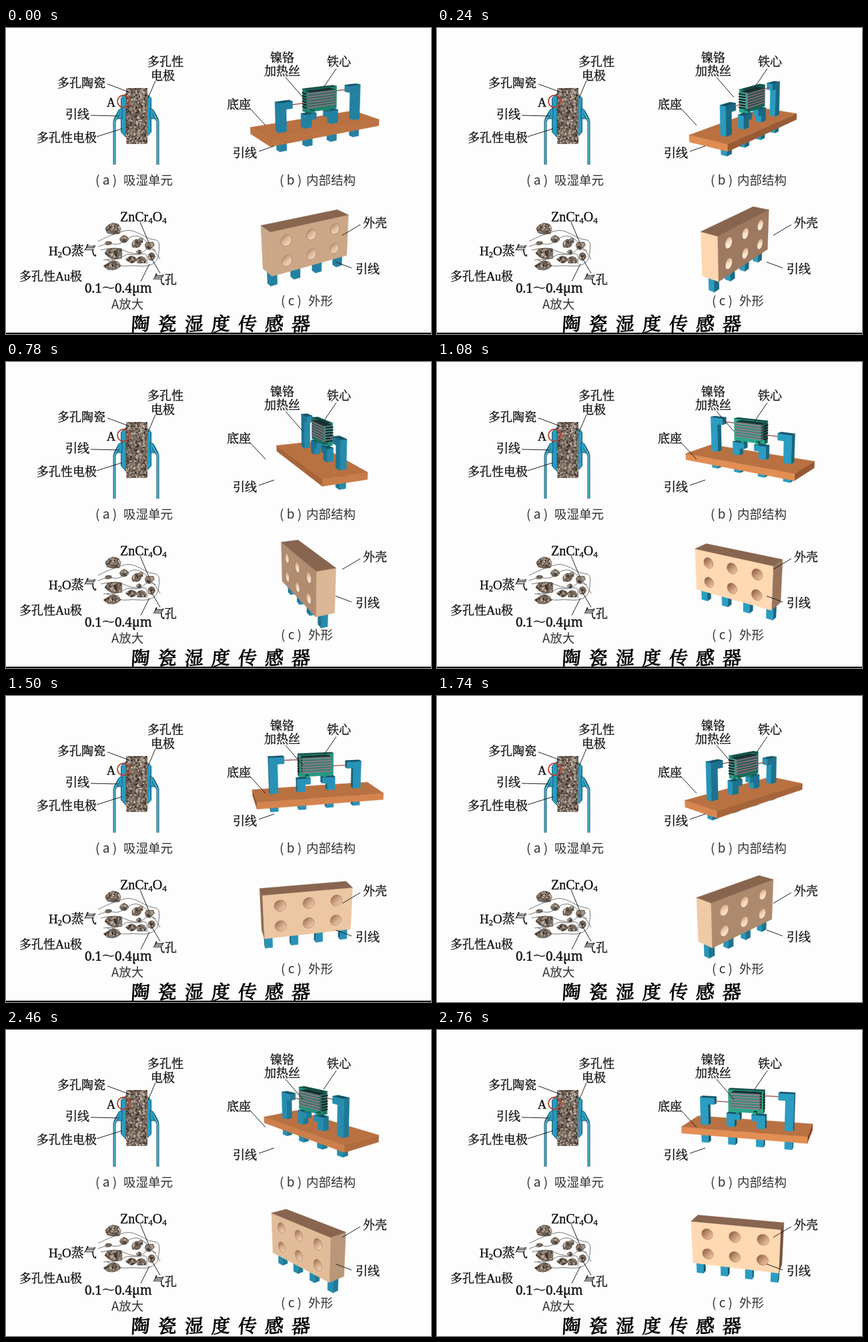
An HTML page with a canvas for the animation above (2820 ms loop, 637 px wide and 459 px high).

```html
<!DOCTYPE html>
<html lang="zh">
<head>
<meta charset="utf-8">
<title>陶瓷湿度传感器</title>
<style>
html, body { margin: 0; width: 100%; height: 100%; overflow: hidden; background: #fdfdfd; }
canvas { display: block; }
</style>
</head>
<body>
<canvas id="stage" width="637" height="459"></canvas>
<script>
const W = 637, H = 459, STEP = 60, STEPS = 47, RULE_END = 1680;
const SERIF = '"Liberation Serif", "Noto Serif CJK SC", "Noto Sans CJK SC", serif';
const SANS = '"Noto Sans CJK SC", "Noto Sans CJK", sans-serif';
const WIDE = '"Noto Serif", "Noto Serif CJK SC", "Noto Sans CJK SC", serif';
const stage = document.getElementById('stage').getContext('2d');
const backdrop = document.createElement('canvas');
backdrop.width = W;
backdrop.height = H;
let g = backdrop.getContext('2d');

let seed = 7;
const rnd = () => (seed = (seed * 16807) % 2147483647) / 2147483647;
const clamp = x => Math.max(0, Math.min(1, x));
const mix = (a, b, t) => `rgb(${a.map((v, i) => Math.round(v + (b[i] - v) * t))})`;

function trace(pts, closed = true) {
  g.beginPath();
  pts.forEach(([x, y], i) => i ? g.lineTo(x, y) : g.moveTo(x, y));
  if (closed) g.closePath();
}
function fill(pts, color, edge = color, width = 0.5) {
  trace(pts);
  g.fillStyle = color;
  g.fill();
  g.strokeStyle = edge;
  g.lineWidth = width;
  g.stroke();
}
function line(pts, color = '#222', width = 1) {
  trace(pts, false);
  g.strokeStyle = color;
  g.lineWidth = width;
  g.stroke();
}

// ---------- fixed drawing ----------

function mottle(pts) {
  const xs = pts.map(p => p[0]), ys = pts.map(p => p[1]);
  const x0 = Math.min(...xs), y0 = Math.min(...ys);
  const w = Math.max(...xs) - x0, h = Math.max(...ys) - y0;
  const tones = ['#3c322c', '#50443b', '#6c5c50', '#a79788', '#c6b9ab', '#85766a'];
  g.save();
  trace(pts);
  g.clip();
  g.fillStyle = '#796a5e';
  g.fillRect(x0, y0, w, h);
  for (let i = 0; i < w * h / 5; i++) {
    g.fillStyle = tones[Math.floor(rnd() * tones.length)];
    g.beginPath();
    g.ellipse(x0 + rnd() * w, y0 + rnd() * h, 0.8 + rnd() * 1.7, 0.7 + rnd(), rnd() * 3, 0, 7);
    g.fill();
  }
  g.restore();
}

function rock(x, y, rx, ry) {
  const pts = [];
  for (let i = 0; i < 8; i++) {
    const a = i * Math.PI / 4, r = 0.75 + rnd() * 0.4;
    pts.push([x + Math.cos(a) * rx * r, y + Math.sin(a) * ry * r]);
  }
  mottle(pts);
  trace(pts);
  g.strokeStyle = '#4a4038';
  g.lineWidth = 0.6;
  g.stroke();
}

function wave(pts) {
  g.beginPath();
  g.moveTo(...pts[0]);
  for (let i = 1; i < pts.length - 1; i++) {
    const [x, y] = pts[i], [nx, ny] = pts[i + 1];
    g.quadraticCurveTo(x, y, (x + nx) / 2, (y + ny) / 2);
  }
  g.lineTo(...pts[pts.length - 1]);
  g.strokeStyle = '#555';
  g.lineWidth = 0.8;
  g.stroke();
}

function ink(text, x, y, weight) {
  g.fillText(text, x, y);
  g.lineWidth = weight;
  g.strokeText(text, x, y);
}

// Parts after "_" are one subscript character.
function label(text, x, y, size = 18, family = SERIF) {
  const weight = family === SANS ? 0.01 : 0.35;
  g.fillStyle = g.strokeStyle = family === SANS ? '#333' : '#111';
  text.split('_').forEach((part, i) => {
    if (i) {
      g.font = `${size * 0.66}px ${family}`;
      ink(part[0], x, y + size * 0.36 + 3, weight);
      x += g.measureText(part[0]).width;
      part = part.slice(1);
    }
    g.font = `${size}px ${family}`;
    ink(part, x, y + size * 0.36, weight);
    x += g.measureText(part).width;
  });
}

function drawUnit() {
  const teal = '#2a9cc0', edge = '#155a70';
  for (const side of [-1, 1]) {
    const at = (dx, y) => [195 + side * dx, y];
    fill([at(15, 98), at(22.5, 105), at(22.5, 156), at(15, 164)], teal, edge, 1);
    fill([at(21, 120), at(26, 123), at(33, 136), at(33, 141), at(28, 136), at(21, 136)], teal, edge, 1);
    line([at(26, 128), at(32.5, 140), at(32.5, 205)], edge, 4);
    line([at(26, 128), at(32.5, 140), at(32.5, 205)], '#5cc0d8', 1.8);
  }
  mottle([[180, 90], [212, 90], [212, 174], [180, 174]]);
  g.beginPath();
  g.arc(176, 110, 9, 0, 7);
  g.strokeStyle = '#b5402c';
  g.lineWidth = 1.8;
  g.stroke();
  line([[224, 79], [213, 105]]);
  line([[152, 84], [187, 97]]);
  line([[127, 131], [168, 132]]);
  line([[136, 163], [174, 151]]);
}

function drawPores() {
  const rocks = [
    [160, 301, 13, 10], [177, 317, 7, 6], [154, 323, 5, 3], [162, 338, 14, 9], [160, 357, 12, 8],
    [195, 324, 8, 7], [202, 319, 4, 4], [215, 326, 7, 6], [188, 347, 8, 6],
    [203, 348, 8, 6], [218, 343, 6, 6], [199, 336, 4, 3]
  ];
  rocks.forEach(r => rock(...r));
  wave([[138, 320], [152, 313], [166, 308], [184, 302], [202, 309], [215, 317], [229, 318], [230, 331], [227, 350], [212, 358], [190, 356], [172, 358], [150, 347]]);
  wave([[138, 328], [152, 322], [170, 326], [188, 311], [204, 313], [223, 334], [231, 347]]);
  wave([[142, 333], [165, 328], [183, 337], [202, 340], [211, 330], [225, 334]]);
  wave([[146, 348], [171, 347], [181, 338], [195, 341], [212, 337], [211, 354]]);
  line([[201, 291], [214, 322]]);
  line([[202, 380], [215, 354]]);
  line([[231, 368], [216, 342]]);
}

function drawLabels() {
  label('多孔性', 212, 51);
  label('电极', 217, 72);
  label('多孔陶瓷', 77, 83);
  label('A', 151, 112);
  label('引线', 89, 130);
  label('多孔性电极', 46, 165);
  label('ZnCr_4O_4', 171, 283, 20);
  label('H_2O蒸气', 64, 334, 19);
  label('多孔性Au极', 20, 373);
  label('0.1～0.4μm', 118, 390, 19, WIDE);
  label('气孔', 220, 378);
  label('镍铬', 396, 45);
  label('加热丝', 387, 65);
  label('铁心', 481, 51);
  label('底座', 331, 115);
  label('引线', 340, 188);
  label('外壳', 535, 293);
  label('引线', 524, 362);
  const captions = [['( a )', 134, '吸湿单元', 176, 228], ['( b )', 410, '内部结构', 450, 228], ['( c )', 412, '外形', 453, 409]];
  for (const [key, x, text, tx, y] of captions) {
    label(key, x, y, 19, SANS);
    label(text, tx, y, 18.5, SANS);
  }
  label('A放大', 158, 414, 18.5, SANS);
  g.font = `28px ${SERIF}`;
  g.fillStyle = g.strokeStyle = '#000';
  g.textAlign = 'center';
  [...'陶瓷湿度传感器'].forEach((c, i) => {
    g.save();
    g.translate(201 + i * 40.1, 454);
    g.transform(1, -0.07, -0.06, 1, 0, 0);
    ink(c, 0, 0, 0.9);
    g.restore();
  });
  g.textAlign = 'left';
}

// ---------- turning models ----------

const DIST = 600;
const CLAY = { dark: [90, 56, 40], light: [254, 217, 178], top: 0.28 };
const WOOD = { dark: [104, 56, 30], light: [226, 142, 84], top: 0.66 };
const TEAL = { dark: [14, 70, 88], light: [43, 156, 194], top: 0.15 };
const GREEN = { dark: [8, 54, 50], light: [40, 166, 138], top: 0.2 };
const COIL = { dark: [20, 34, 38], light: [74, 158, 148], top: 0.1 };

// Yaw in degrees at chosen steps.
const TURN = [[0, -32], [8, -79], [18, -148], [25, -194], [29, -227], [36, -276], [46, -345]];
function yawAt(step) {
  const i = Math.max(1, TURN.findIndex(p => p[0] >= step));
  const [s0, a0] = TURN[i - 1], [s1, a1] = TURN[i];
  return (a0 + (a1 - a0) * (step - s0) / (s1 - s0)) * Math.PI / 180;
}

function makeView(cx, cy, pitch, yaw) {
  const c = Math.cos(yaw), s = Math.sin(yaw);
  const cp = Math.cos(pitch), sp = Math.sin(pitch);
  const spin = (u, v) => [u * c - v * s, u * s + v * c];
  return {
    s,
    spin,
    at(u, v, z) {
      const [x, d] = spin(u, v);
      const k = DIST / (DIST - d * cp - z * sp);
      return [cx + x * k, cy + (d * sp - z * cp) * k];
    },
    faces(n, p) {
      const [nx, nd] = spin(n[0], n[1]), [px, pd] = spin(p[0], p[1]);
      return -nx * px + nd * (DIST * cp - pd) + n[2] * (DIST * sp - p[2]) > 0;
    }
  };
}

function light(view, nu, nv) {
  const [x, d] = view.spin(nu, nv);
  return clamp(d * (1 - 0.35 * x));
}

function box(view, u0, u1, v0, v1, z0, z1, mat) {
  const lo = [u0, v0, z0], hi = [u1, v1, z1];
  const mid = lo.map((v, i) => (v + hi[i]) / 2);
  for (let axis = 0; axis < 3; axis++) {
    for (const sign of [-1, 1]) {
      const n = [0, 0, 0], p = [...mid];
      n[axis] = sign;
      p[axis] = sign > 0 ? hi[axis] : lo[axis];
      if (!view.faces(n, p)) continue;
      const b = (axis + 1) % 3, e = (axis + 2) % 3;
      const pts = [[lo, lo], [hi, lo], [hi, hi], [lo, hi]].map(([m, q]) => {
        const r = [...p];
        r[b] = m[b];
        r[e] = q[e];
        return view.at(...r);
      });
      fill(pts, mix(mat.dark, mat.light, axis === 2 ? mat.top : light(view, n[0], n[1])));
    }
  }
}

function legs(view, spots, v, z0, z1) {
  [...spots].sort((a, b) => (a - b) * view.s)
    .forEach(u => box(view, u - 5.5, u + 5.5, v - 5, v + 5, z0, z1, TEAL));
}

function core(view, v) {
  box(view, -26, 26, v - 5, v + 5, 23, 56, GREEN);
  box(view, -21, 21, v - 6.5, v + 6.5, 28, 52, COIL);
  for (let z = 30; z <= 51; z += 4) {
    for (const sign of [-1, 1]) {
      const side = v + sign * 6.7;
      if (view.faces([0, sign, 0], [0, side, z])) {
        line([view.at(-24, side, z), view.at(24, side, z)], '#a8757a', 1.2);
        line([view.at(-22, side, z + 1.4), view.at(22, side, z + 1.4)], '#3c4a50', 0.6);
      }
      const u = sign * 26.2;
      if (view.faces([sign, 0, 0], [u, v, z])) line([view.at(u, v - 6, z), view.at(u, v + 6, z)], '#17181c', 1.8);
    }
  }
}

function drawInside(yaw) {
  const row = 8;
  const view = makeView(466, 143, 16 * Math.PI / 180, yaw);
  legs(view, [-64, -21.5, 21.5, 64], row, -28, -9);
  box(view, -93, 93, -33, 33, -10, 0, WOOD);
  const parts = [[0, () => core(view, row)]];
  const add = (sign, a, b, z0, z1, depth = 5, mat = TEAL) => {
    const u0 = Math.min(sign * a, sign * b), u1 = Math.max(sign * a, sign * b);
    parts.push([(u0 + u1) / 2, () => box(view, u0, u1, row - depth, row + depth, z0, z1, mat)]);
  };
  for (const sign of [-1, 1]) {
    const h = sign > 0 ? 54 : 42;
    add(sign, 58, 70, 0, h);
    add(sign, 48, 58, h - 10, h);
    add(sign, 17, 29, 0, 20);
    add(sign, 9, 17, 11, 20);
    add(sign, 11, 15, 20, 24, 3, GREEN);
    parts.push([sign * 37, () => line([view.at(sign * 26, row, h - 6), view.at(sign * 48, row, h - 6)], '#a4605a', 1.5)]);
  }
  parts.sort((a, b) => (a[0] - b[0]) * view.s).forEach(p => p[1]());
}

function hole(view, u, v, z, lit) {
  const pts = [];
  for (let i = 0; i < 24; i++) {
    const a = i * Math.PI / 12;
    pts.push(view.at(u + 8.5 * Math.cos(a), v, z + 8.5 * Math.sin(a)));
  }
  const xs = pts.map(p => p[0]), ys = pts.map(p => p[1]);
  const shade = g.createLinearGradient(Math.min(...xs), Math.min(...ys), Math.max(...xs), Math.max(...ys));
  const glow = clamp(1.45 - lit * 1.3);
  shade.addColorStop(0.1, mix([128, 84, 58], [214, 172, 142], glow));
  shade.addColorStop(0.5, mix([186, 134, 100], [255, 232, 208], glow));
  shade.addColorStop(0.9, mix([235, 188, 150], [255, 246, 234], glow));
  fill(pts, shade, '#a0704f', 0.6);
}

function drawOutside(yaw) {
  const view = makeView(450, 320, 23 * Math.PI / 180, yaw);
  legs(view, [-59, -19.5, 19.5, 59], 0, -55, -32);
  box(view, -66.5, 66.5, -14.5, 14.5, -34, 34, CLAY);
  for (const sign of [-1, 1]) {
    const v = sign * 14.5;
    if (!view.faces([0, sign, 0], [0, v, 0])) continue;
    for (const u of [-42, 0, 42]) for (const z of [-16, 16]) hole(view, u, v, z, light(view, 0, sign));
  }
}

function drawLeaders() {
  line([[419, 74], [445, 104]]);
  line([[495, 61], [476, 89]]);
  line([[366, 121], [389, 146]]);
  line([[379, 185], [402, 177]]);
  line([[531, 295], [504, 311]]);
  line([[518, 360], [494, 351]]);
}

g.fillStyle = '#fdfdfd';
g.fillRect(0, 0, W, H);
drawUnit();
drawPores();
drawLabels();
g = stage;

function frame() {
  const t = performance.now() % (STEP * STEPS);
  const yaw = yawAt(Math.floor(t / STEP));
  g.drawImage(backdrop, 0, 0);
  drawInside(yaw);
  drawOutside(yaw);
  drawLeaders();
  if (t < RULE_END) {
    g.fillStyle = '#000';
    g.fillRect(0, 457, W, 2);
  }
  requestAnimationFrame(frame);
}
frame();
</script>
</body>
</html>
```
